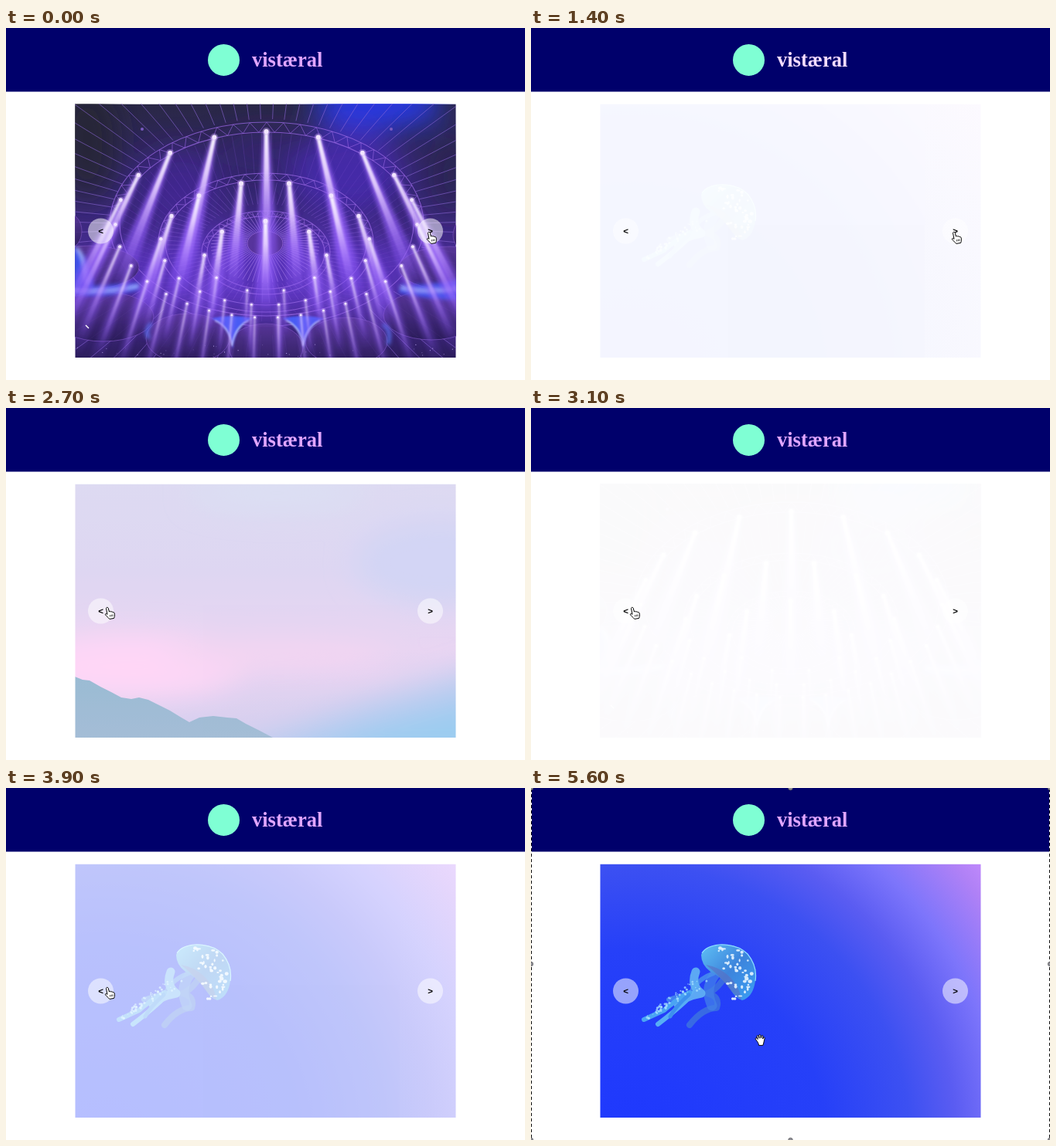
An HTML page for the animation above (5.7 s loop, 671 by 456 pixels).

```html
<!DOCTYPE html>
<html lang="en">
<head>
<meta charset="utf-8">
<title>Carousel</title>
<style>
  html, body { margin: 0; width: 100%; height: 100%; overflow: hidden; background: #fff; }
  svg { display: block; width: 671px; height: 456px; }
  .title { font: bold 26.5px "Liberation Serif", "Times New Roman", serif; }
  .arrow { font: bold 11.5px "Liberation Sans", Arial, sans-serif; text-anchor: middle; }
</style>
</head>
<body>
<svg id="stage" viewBox="0 0 671 456" xmlns="http://www.w3.org/2000/svg">
  <defs>
    <clipPath id="photo"><rect x="89.5" y="98.7" width="492" height="328.3"/></clipPath>
    <filter id="soft" x="-50%" y="-50%" width="200%" height="200%"><feGaussianBlur stdDeviation="18"/></filter>
    <filter id="glow" x="-20%" y="-20%" width="140%" height="140%"><feGaussianBlur stdDeviation="2.5"/></filter>
    <filter id="fine" x="-10%" y="-10%" width="120%" height="120%"><feGaussianBlur stdDeviation=".8"/></filter>

    <linearGradient id="hall" x1="0" y1="0" x2="0" y2="1">
      <stop offset="0" stop-color="#2a2846"/><stop offset=".3" stop-color="#32266a"/>
      <stop offset=".6" stop-color="#472c94"/><stop offset=".82" stop-color="#452a8c"/><stop offset="1" stop-color="#2b1d5a"/>
    </linearGradient>
    <linearGradient id="beam" x1="0" y1="0" x2="0" y2="1">
      <stop offset="0" stop-color="#fff"/><stop offset=".25" stop-color="#eedcff" stop-opacity=".9"/>
      <stop offset=".6" stop-color="#b88cff" stop-opacity=".5"/><stop offset="1" stop-color="#8e5cff" stop-opacity="0"/>
    </linearGradient>
    <linearGradient id="halo" x1="0" y1="0" x2="0" y2="1">
      <stop offset="0" stop-color="#a874ff"/><stop offset=".5" stop-color="#8f5cf8" stop-opacity=".75"/>
      <stop offset="1" stop-color="#7a48ec" stop-opacity="0"/>
    </linearGradient>
    <linearGradient id="tent" x1="0" y1="0" x2="0" y2="1">
      <stop offset="0" stop-color="#5a389a"/><stop offset="1" stop-color="#2a1c58"/>
    </linearGradient>

    <linearGradient id="sky" x1="0" y1="0" x2="0" y2="1">
      <stop offset="0" stop-color="#d3cfee"/><stop offset=".35" stop-color="#d4caee"/>
      <stop offset=".65" stop-color="#e2c8ee"/><stop offset="1" stop-color="#c8c0ea"/>
    </linearGradient>
    <linearGradient id="hill" x1="0" y1="0" x2="0" y2="1">
      <stop offset="0" stop-color="#7ba6c6"/><stop offset="1" stop-color="#88a9ca"/>
    </linearGradient>

    <radialGradient id="sea" gradientUnits="userSpaceOnUse" cx="130" cy="460" r="600">
      <stop offset="0" stop-color="#1e38fe"/><stop offset=".42" stop-color="#2640f8"/>
      <stop offset=".6" stop-color="#3c50f2"/><stop offset=".7" stop-color="#5a5cf2"/>
      <stop offset=".8" stop-color="#7d75fb"/><stop offset=".92" stop-color="#b081f6"/><stop offset="1" stop-color="#ca8eff"/>
    </radialGradient>
    <linearGradient id="bell" x1="0" y1="0" x2="1" y2="1">
      <stop offset="0" stop-color="#5fc0f5"/><stop offset=".5" stop-color="#3d84dc"/><stop offset="1" stop-color="#3ba0f4"/>
    </linearGradient>
  </defs>

  <rect width="671" height="456" fill="#fff"/>
  <rect width="671" height="82.5" fill="#00006b"/>
  <circle cx="281.5" cy="41.4" r="20.5" fill="#7fffd4"/>
  <text id="title" class="title" x="318" y="50">vistæral</text>

  <g clip-path="url(#photo)">
    <g id="concert"></g>
    <g id="dusk">
      <rect x="89" y="98" width="493" height="330" fill="url(#sky)"/>
      <g filter="url(#soft)">
        <ellipse cx="165" cy="335" rx="145" ry="42" fill="#ffcaf4"/>
        <ellipse cx="350" cy="322" rx="150" ry="18" fill="#f2c8ef"/>
        <ellipse cx="560" cy="200" rx="110" ry="55" fill="#c5c8f2"/>
        <ellipse cx="350" cy="110" rx="110" ry="22" fill="#d0d6ef"/>
        <path d="M300 440L440 390L620 335V460H300Z" fill="#a5bdec"/>
        <path d="M360 450L480 410L620 375V460H360Z" fill="#7dbdec"/>
      </g>
      <path d="M89 348L99 352L108 353L122 361L136 368L149 375L162 377L172 375L184 378L196 384L212 392L225 400L237 407L250 401L268 399L286 401L298 402L310 409L328 418L345 427V428H89Z" fill="url(#hill)"/>
    </g>
    <g id="jelly"></g>
  </g>

  <g id="buttons"></g>
  <g id="selection">
    <path d="M.5 0V456M670.5 0V456" stroke="#fff"/>
    <path id="ants" d="M.5 1V454M670.5 1V454" stroke="#111" stroke-dasharray="4 3"/>
    <g id="handles" fill="#8b8b93" stroke="#555" stroke-width=".6"></g>
  </g>
  <g id="cursor" fill="#fff" stroke="#000" stroke-width="1" stroke-linejoin="round">
    <path id="arrow" d="M0 0V12L2.8 9.4L4.8 14L6.8 13L4.8 8.8H8.6Z"/>
    <g id="point">
      <path d="M-1.5.6C-1.6-1 .9-1.2 1.3.5L2.4 5C3 4 4.5 4.2 4.7 5.2C5.4 4.3 6.8 4.7 7 5.8C8 5.2 9 5.8 9.2 7C9.7 9.5 9.5 11 8.6 13.4L2.8 14.4C1 12 -1 11 -2.5 8.9C-3 7.3 -1.4 7 0 8.4Z"/>
      <path d="M3.6 9V11.5M5.4 8.7V11.2M7.1 8.4V11" stroke-width=".7"/>
    </g>
    <path id="open" d="M-2.6 8.2L-4.8 5.2C-5.2 3.7 -3.6 3.2 -2.7 4.5L-1.8 5.5L-3 1.7C-2.9.2 -1.3.2 -.9 1.5L0 4.2L-.3.4C.1-1 1.6-.8 1.8.5L2.3 4.1L3.1 1.2C3.7 0 5 .4 4.9 1.7L4.6 5L5.6 3.3C6.6 2.5 7.4 3.3 7.1 4.5C6.2 7.3 6.2 10 4.8 13.4H-.5C-.8 11 -1.6 9.6 -2.6 8.2Z"/>
  </g>
</svg>
<script>
const LOOP = 5700, STEP = 100, FADE = 800;
const $ = id => document.getElementById(id);

function add(parent, tag, attrs, text) {
  const el = document.createElementNS('http://www.w3.org/2000/svg', tag);
  for (const key in attrs) el.setAttribute(key, attrs[key]);
  if (text) el.textContent = text;
  return parent.appendChild(el);
}

function seeded(seed) {
  return () => (seed = (seed * 16807) % 2147483647) / 2147483647;
}

const onEllipse = (cx, cy, rx, ry, a) => [cx + rx * Math.sin(a), cy - ry * Math.cos(a)];
const join = points => 'M' + points.map(p => p.map(v => v.toFixed(1)).join(' ')).join('L');

function spokes(parent, count, inner, outer, attrs) {
  let d = '';
  for (let i = 0; i < count; i++) {
    const a = (i + .5) / count * 2 * Math.PI;
    d += join([onEllipse(...inner, a), onEllipse(...outer, a)]);
  }
  add(parent, 'path', { d, fill: 'none', ...attrs });
}

function truss(parent, cx, cy, rx, ry, depth, count) {
  const zigzag = [];
  for (let i = 0; i <= count; i++) {
    const a = (i / count - .5) * 2.9, grow = i % 2 ? depth : 0;
    zigzag.push(onEllipse(cx, cy, rx + grow, ry + grow, a));
  }
  const g = add(parent, 'g', { fill: 'none', stroke: '#9a68e4', 'stroke-opacity': .75 });
  for (const grow of [0, depth])
    add(g, 'ellipse', { cx, cy, rx: rx + grow, ry: ry + grow, 'stroke-width': 1.1 });
  add(g, 'path', { d: join(zigzag), 'stroke-width': .8 });
}

// Lamps evenly spaced on a ring in perspective; "spread" widens the gaps at the near (top) side.
function lampRing(layers, [cx, cy, rx, ry], count, shift, spread, reach) {
  for (let i = 0; i < count; i++) {
    const turn = (i + shift) / count * 2 * Math.PI;
    const a = 2 * Math.atan(spread * Math.tan(turn / 2));
    const [x, y] = onEllipse(cx, cy, rx, ry, a);
    const near = (1 + Math.cos(a)) / 2;
    const length = reach * (.45 + .55 * near), wide = 3 + 8 * near;
    const tilt = -Math.atan2(x - 335, y + 150) * 180 / Math.PI;
    const transform = `translate(${x} ${y}) rotate(${tilt})`;
    const cone = (top, bottom, reach) => `M${-top} 0H${top}L${bottom} ${reach}H${-bottom}Z`;
    add(layers.halo, 'path', {
      transform, d: cone(3, wide * 1.7, length * 1.15), fill: 'url(#halo)', opacity: .45 + .45 * near
    });
    add(layers.core, 'path', {
      transform, d: cone(1 + 1.3 * near, wide * .6, length), fill: 'url(#beam)', opacity: .55 + .4 * near
    });
    add(layers.lamps, 'circle', { cx: x, cy: y, r: 1.5 + 1.5 * near, fill: '#fff' });
    add(layers.lamps, 'circle', { cx: x, cy: y, r: 3 + 2 * near, fill: '#d9b8ff', opacity: .35 });
  }
}

function drawConcert(g) {
  add(g, 'rect', { x: 89, y: 98, width: 493, height: 330, fill: 'url(#hall)' });
  const haze = add(g, 'g', { filter: 'url(#soft)' });
  const blob = (cx, cy, rx, ry, fill, opacity) => add(haze, 'ellipse', { cx, cy, rx, ry, fill, opacity });
  blob(480, 100, 85, 32, '#2b3cf2', .9);
  blob(335, 315, 200, 55, '#6436d0', .6);
  blob(440, 185, 75, 55, '#4a2cb8', .8);
  blob(225, 205, 55, 50, '#4a2aa4', .6);
  blob(105, 150, 40, 75, '#252634', .85);
  blob(575, 190, 28, 55, '#28244c', .7);
  blob(335, 160, 60, 25, '#39257c', .6);

  spokes(g, 84, [337, 258, 204, 140], [337, 258, 430, 330], { stroke: '#8c68d8', 'stroke-opacity': .6, 'stroke-width': 1 });
  spokes(g, 90, [336, 278, 142, 88], [337, 258, 186, 122], { stroke: '#7c50cc', 'stroke-opacity': .35, 'stroke-width': .7 });
  spokes(g, 84, [335, 280, 84, 52], [336, 278, 128, 78], { stroke: '#9468dd', 'stroke-opacity': .42, 'stroke-width': .8 });
  spokes(g, 66, [335, 279, 24, 17], [335, 284, 70, 46], { stroke: '#b48af0', 'stroke-opacity': .6, 'stroke-width': .9 });
  add(g, 'ellipse', { cx: 335, cy: 279, rx: 23, ry: 16, fill: '#57349c', stroke: '#8a60cc' });

  truss(g, 337, 254, 190, 119, 13, 54);
  truss(g, 336, 278, 130, 81, 9, 44);
  truss(g, 336, 291, 76, 47, 7, 32);

  for (const [cx, cy, rx, ry] of [[108, 310, 64, 28], [574, 311, 66, 28], [82, 263, 16, 22], [594, 268, 16, 20],
      [126, 374, 65, 32], [550, 372, 62, 32], [235, 402, 54, 32], [336, 414, 48, 31], [440, 406, 53, 31]])
    add(g, 'ellipse', { cx, cy, rx, ry, fill: 'url(#tent)', stroke: '#7a52bc', 'stroke-width': .8, opacity: .88 });

  const shine = add(g, 'g', { filter: 'url(#glow)' });
  add(shine, 'path', { d: 'M87 283Q108 290 113 334L172 330L174 339Q130 350 87 346Z', fill: '#3f58f4', opacity: .9 });
  add(shine, 'path', { d: 'M584 352Q548 352 508 343L510 332Q545 334 584 326Z', fill: '#3f58f4', opacity: .9 });
  add(shine, 'path', { d: 'M87 340Q135 343 172 334M510 336Q545 344 584 337M92 285Q102 298 104 330', fill: 'none', stroke: '#b8c8ff', 'stroke-width': 3 });
  add(shine, 'path', { d: 'M487 384Q499 390 494 410M188 382Q178 392 185 402', fill: 'none', stroke: '#5a78f4', 'stroke-width': 4 });
  const gaps = add(g, 'g', { filter: 'url(#fine)' });
  for (const x of [292, 384]) {
    add(gaps, 'path', { d: `M${x - 27} 376Q${x} 370 ${x + 27} 376Q${x + 5} 386 ${x + 1} 416Q${x - 4} 386 ${x - 27} 376Z`, fill: '#4a5cf4' });
    add(gaps, 'path', { d: `M${x - 22} 379Q${x - 3} 387 ${x} 412Q${x + 4} 387 ${x + 22} 379`, fill: 'none', stroke: '#c4d4ff', 'stroke-width': 1.4 });
  }

  const layers = {
    halo: add(g, 'g', { filter: 'url(#glow)' }),
    core: add(g, 'g', { filter: 'url(#fine)' }),
    lamps: add(g, 'g', {})
  };
  lampRing(layers, [336.5, 254.5, 195, 120.5], 27, 0, 1.52, 200);
  lampRing(layers, [335, 279, 135, 80], 18, .5, 1.33, 145);
  lampRing(layers, [335.5, 296, 79, 46], 9, 0, 1.15, 120);

  const rand = seeded(71);
  for (let i = 0; i < 40; i++)
    add(g, 'circle', { cx: 92 + rand() * 486, cy: 408 + rand() * 18, r: .6, fill: '#c9b8ff', opacity: rand() });
  for (const x of [176, 498])
    add(g, 'circle', { cx: x, cy: 131, r: 2, fill: '#7a5cc0' });
  add(g, 'path', { d: 'M103 385L107 389', stroke: '#fff', 'stroke-width': 1.5 });
}

function drawJelly(g) {
  add(g, 'rect', { x: 89, y: 98, width: 493, height: 330, fill: 'url(#sea)' });
  const arms = add(g, 'g', { fill: 'none', 'stroke-linecap': 'round', 'stroke-linejoin': 'round' });
  const arm = (d, stroke, width, opacity = 1) => add(arms, 'path', { d, stroke, 'stroke-width': width, opacity });
  arm('M252 243Q240 262 228 266Q245 270 240 285Q222 285 205 307', '#3f78dd', 8, .75);
  arm('M244 235Q222 255 234 282', '#4483e8', 13, .7);
  arm('M236 240Q214 248 207 265L178 274', '#4a93ee', 6, .8);
  arm('M213 238Q206 256 220 266Q198 270 190 280', '#62b4f4', 11, .9);
  arm('M205 265Q185 276 172 288L146 300', '#4aa4f3', 6);
  arm('M200 276Q185 290 164 306', '#57aef5', 6);
  arm('M204 268Q186 284 180 296', '#3d90ee', 5);
  add(g, 'path', {
    d: 'M220 216Q224 205 243 203Q266 201 280 215Q294 231 290 250Q287 271 273 275Q264 272 258 261Q247 245 232 238Q220 229 220 216Z',
    fill: 'url(#bell)'
  });
  add(g, 'path', { d: 'M226 229Q246 232 260 248Q270 260 272 274Q262 268 255 258Q244 243 226 229Z', fill: '#5a6fc4', opacity: .6 });
  add(g, 'path', { d: 'M221 214Q226 205 243 203Q267 202 280 215Q293 231 290 250', fill: 'none', stroke: '#8bdcff', 'stroke-width': 1.2 });

  const rand = seeded(19);
  for (let i = 0; i < 44; i++) {
    const a = (i / 44 - .36) * 3.4, depth = 8 + 31 * Math.sqrt(rand());
    const [cx, cy] = onEllipse(252, 241, depth * .92, depth * .92, a + .85);
    add(g, 'ellipse', { cx, cy, rx: 1 + rand() * 1.7, ry: 1 + rand() * 1.5, fill: '#e6f4ff', opacity: .9 });
  }
  for (let i = 0; i < 60; i++) {
    const s = rand(), spread = 4 + 13 * (1 - s);
    add(g, 'circle', {
      cx: 222 - 74 * s + (rand() - .5) * spread, cy: 250 + 48 * s + (rand() - .5) * spread,
      r: .6 + rand() * 1.1, fill: '#a8e2ff', opacity: .75
    });
  }
}

drawConcert($('concert'));
drawJelly($('jelly'));

for (const [x, sign] of [[122.5, '<'], [548.5, '>']]) {
  add($('buttons'), 'circle', { cx: x, cy: 263, r: 16.5, fill: '#fff', 'fill-opacity': .52 });
  add($('buttons'), 'text', { class: 'arrow', x, y: 267 }, sign);
}
for (const [cx, cy] of [[0, 0], [335.5, 0], [671, 0], [0, 228], [671, 228], [0, 456], [335.5, 456], [671, 456]])
  add($('handles'), 'circle', { cx, cy, r: 2.8 });

// The CSS "ease" curve.
function ease(x) {
  if (x <= 0 || x >= 1) return x <= 0 ? 0 : 1;
  let lo = 0, hi = 1;
  for (let i = 0; i < 20; i++) {
    const s = (lo + hi) / 2, bx = .75 * s * (1 - s) + s * s * s;
    if (bx < x) lo = s; else hi = s;
  }
  return .3 * lo * (1 - lo) ** 2 + 3 * lo * lo * (1 - lo) + lo ** 3;
}

const slides = [[-FADE, 'concert'], [60, 'dusk'], [1350, 'jelly'], [2330, 'dusk'], [3070, 'concert'], [3730, 'jelly']];
const SELECT_AT = 5200;
const rightSpot = [547, 265], leftSpot = [131, 259], endSpot = [295, 320];

function cursorAt(t) {
  const glide = (from, to, start, end) => {
    const k = Math.min(1, Math.max(0, (t - start) / (end - start))), s = k * k * (3 - 2 * k);
    return from.map((v, i) => v + (to[i] - v) * s);
  };
  return t < 3000 ? glide(rightSpot, leftSpot, 1700, 2250) : glide(leftSpot, endSpot, 4500, 5100);
}

function render(time) {
  const t = Math.floor(time % LOOP / STEP) * STEP;
  const [start, current] = slides.filter(s => s[0] <= t).pop();
  const alpha = ease((t - start) / FADE);
  for (const id of ['concert', 'dusk', 'jelly']) {
    $(id).setAttribute('display', id === current ? 'inline' : 'none');
    $(id).setAttribute('opacity', alpha);
  }
  $('title').setAttribute('fill', alpha < .1 && current === 'jelly' ? '#f5dcff' : '#e0a6ff');

  const [x, y] = cursorAt(t), selected = t >= SELECT_AT;
  const overButton = [122.5, 548.5].some(bx => Math.hypot(x - bx, y - 263) < 17);
  const shape = selected ? 'open' : overButton ? 'point' : 'arrow';
  for (const id of ['arrow', 'point', 'open'])
    $(id).setAttribute('display', id === shape ? 'inline' : 'none');
  $('cursor').setAttribute('transform', `translate(${x} ${y})`);
  $('selection').setAttribute('display', selected ? 'inline' : 'none');
  $('ants').setAttribute('stroke-dashoffset', -t / STEP);
}

const begin = performance.now();
(function frame() {
  render(performance.now() - begin);
  requestAnimationFrame(frame);
})();
</script>
</body>
</html>
```
